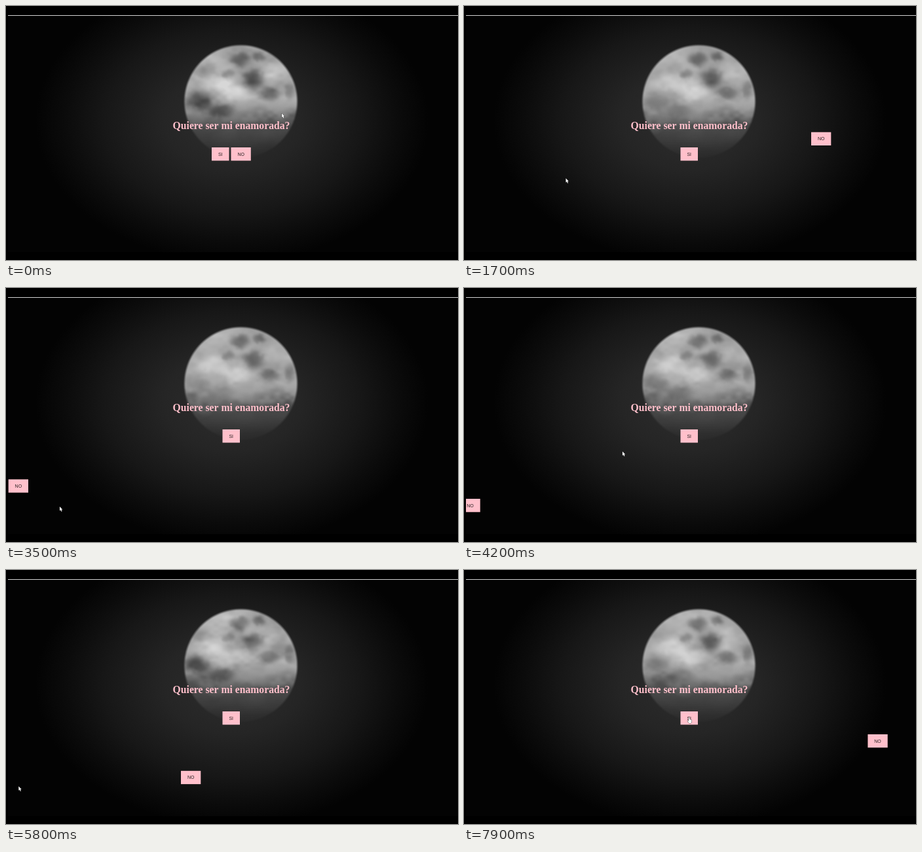
Write an HTML page with a canvas that moves like this. It is 690x388 px and loops after 8000 ms.

```html
<!DOCTYPE html>
<html lang="es">
<head>
<meta charset="utf-8">
<style>
  html, body { margin: 0; width: 100%; height: 100%; overflow: hidden; background: #000; }
  canvas { display: block; }
</style>
</head>
<body>
<canvas id="stage" width="690" height="388"></canvas>
<script>
const ctx = document.getElementById('stage').getContext('2d');
const LOOP = 8000, STEP = 100;
const PINK = '#ffc0cb';

// Moon drawn pixel by pixel into a small buffer
const SIZE = 196, OX = 260, OY = 47;
const MOON = { x: 358, y: 145.5, r: 86.5 };
const buf = document.createElement('canvas');
buf.width = buf.height = SIZE;
const bctx = buf.getContext('2d');
const img = bctx.createImageData(SIZE, SIZE);

// x, y, rx, ry, strength (negative is bright)
const seas = [
  [355, 82, 14, 10, .36], [386, 77, 10, 8, .3], [375, 110, 17, 13, .42],
  [401, 133, 16, 10, .32], [339, 103, 9, 6, .2], [433, 128, 9, 12, .22],
  [318, 118, 26, 15, -.22], [348, 134, 22, 12, -.2], [402, 100, 14, 12, -.08]
];
const clouds = [
  [293, 144, 21, 14, .5], [326, 161, 20, 11, .4], [298, 100, 15, 9, .12]
];

// time, x, y of the pointer tip
const mouse = [
  [0, 421, 164], [300, 360, 226], [1000, 374.5, 27], [1600, 142, 267],
  [2400, 456, 180], [2600, 540, 201], [3500, 82, 334], [3700, 20, 305],
  [4900, 610, 158], [5700, 14, 332], [6700, 204.5, 281], [6900, 274, 314],
  [7700, 343, 225], [8000, 343, 225]
];

// time, x, y of the runaway button
const jumps = [
  [0, 343.5, 216], [300, 127, 258], [1600, 530, 192.7], [2600, 3.7, 292.3],
  [3700, -5.6, 322], [5700, 267, 306.8], [6900, 616.4, 251]
];

const clamp = v => Math.max(0, Math.min(1, v));
const mix = (a, b, k) => a + (b - a) * k;
const smooth = (a, b, v) => { const k = clamp((v - a) / (b - a)); return k * k * (3 - 2 * k); };

function hash(x, y) {
  let h = Math.imul(x, 374761393) + Math.imul(y, 668265263);
  h = Math.imul(h ^ (h >>> 13), 1274126177);
  return ((h ^ (h >>> 16)) >>> 0) / 4294967296;
}

function noise(x, y) {
  const i = Math.floor(x), j = Math.floor(y);
  const u = smooth(0, 1, x - i), v = smooth(0, 1, y - j);
  return mix(mix(hash(i, j), hash(i + 1, j), u), mix(hash(i, j + 1), hash(i + 1, j + 1), u), v);
}

const fbm = (x, y) => noise(x, y) * .55 + noise(x * 2.1, y * 2.1) * .3 + noise(x * 4.3, y * 4.3) * .15;

function blobs(list, x, y) {
  let sum = 0;
  for (const [cx, cy, rx, ry, s] of list) {
    const d = ((x - cx) / rx) ** 2 + ((y - cy) / ry) ** 2;
    if (d < 4) sum += s * Math.exp(-d * Math.sqrt(d));
  }
  return sum;
}

function drawMoon(t) {
  const haze = .5 - .5 * Math.cos((t - 2900) / 6000 * Math.PI * 2);
  const drift = t / 1000 * .22;
  let p = 0;
  for (let j = 0; j < SIZE; j++) {
    for (let i = 0; i < SIZE; i++, p += 4) {
      const x = i + OX, y = j + OY;
      const edge = 1 - smooth(MOON.r - 3, MOON.r + 2, Math.hypot(x - MOON.x, y - MOON.y));
      if (!edge) { img.data[p + 3] = 0; continue; }
      const n = fbm(x / 34 - drift, y / 24 + 7) - .5;
      const warp = (fbm(x / 19 + 31, y / 19) - .5) * 10;
      const sea = blobs(seas, x + warp, y - warp);
      const cloud = blobs(clouds, x - warp, y + warp) * mix(.25, 1, haze);
      const light = 172 * (1 - sea - cloud + n * mix(.25, .45, haze));
      const bank = smooth(142, 186, y + n * 46);
      const vis = mix(1, .22 * (1 - smooth(180, 232, y)) + .03, bank);
      img.data[p] = img.data[p + 1] = img.data[p + 2] = Math.min(215, light);
      img.data[p + 3] = 255 * edge * vis;
    }
  }
  bctx.putImageData(img, 0, 0);
  ctx.drawImage(buf, OX, OY);
}

function drawSky() {
  ctx.fillStyle = '#000';
  ctx.fillRect(0, 0, 690, 388);
  ctx.save();
  ctx.beginPath();
  ctx.rect(3, 15, 687, 361);
  ctx.clip();
  ctx.translate(345, 175);
  ctx.scale(1, .72);
  const g = ctx.createRadialGradient(0, 0, 0, 0, 0, 300);
  g.addColorStop(0, '#2e2e2e');
  g.addColorStop(.35, '#252525');
  g.addColorStop(.65, '#171717');
  g.addColorStop(.85, '#0b0b0b');
  g.addColorStop(1, '#030303');
  ctx.fillStyle = g;
  ctx.fillRect(-345, -300, 690, 600);
  ctx.restore();
}

function button(label, x, y, w) {
  ctx.fillStyle = PINK;
  ctx.fillRect(x, y, w, 20.3);
  ctx.fillStyle = '#2a2022';
  ctx.font = '7px "Liberation Sans", Arial, sans-serif';
  ctx.fillText(label, x + w / 2, y + 12.5);
}

function mouseAt(t) {
  const k = mouse.findIndex(m => m[0] > t);
  const [t0, x0, y0] = mouse[k - 1], [t1, x1, y1] = mouse[k];
  const e = smooth(t0, t1, t);
  return [mix(x0, x1, e), mix(y0, y1, e)];
}

function shape(points) {
  ctx.beginPath();
  for (let i = 0; i < points.length; i += 2) ctx.lineTo(points[i], points[i + 1]);
  ctx.closePath();
  ctx.stroke();
  ctx.fill();
}

function pointer(x, y, hand) {
  ctx.save();
  ctx.translate(x, y);
  ctx.fillStyle = '#fff';
  ctx.strokeStyle = '#222';
  ctx.lineWidth = .8;
  if (hand) shape([0, 0, 1.3, 0, 1.5, 3, 4.5, 4, 4.5, 7, 3.6, 9, .4, 9, -2, 5.6, -1.2, 5, 0, 6]);
  else shape([0, 0, 0, 6.2, 1.4, 5, 2.5, 7.4, 3.5, 6.9, 2.5, 4.6, 4.3, 4.5]);
  ctx.restore();
}

function draw(t) {
  drawSky();
  drawMoon(t);

  ctx.fillStyle = '#d2d2d2';
  ctx.fillRect(3, 14, 687, 1);

  ctx.textAlign = 'center';
  ctx.fillStyle = PINK;
  ctx.font = 'bold 15.7px "Liberation Serif", "Times New Roman", serif';
  ctx.fillText('Quiere ser mi enamorada?', 344, 188);

  const [since, nx, ny] = jumps.filter(s => s[0] <= t).pop();
  button('SI', since ? 330.5 : 314, 216, 26.5);
  ctx.save();
  ctx.beginPath();
  ctx.rect(3, 0, 687, 388);
  ctx.clip();
  button('NO', nx, ny, 30.3);
  ctx.restore();

  const [mx, my] = mouseAt(t);
  pointer(mx, my, t >= 7600);
}

let last = -1;
function tick(now) {
  const t = Math.floor(now % LOOP / STEP) * STEP;
  if (t !== last) draw(last = t);
  requestAnimationFrame(tick);
}
draw(0);
requestAnimationFrame(tick);
</script>
</body>
</html>
```
